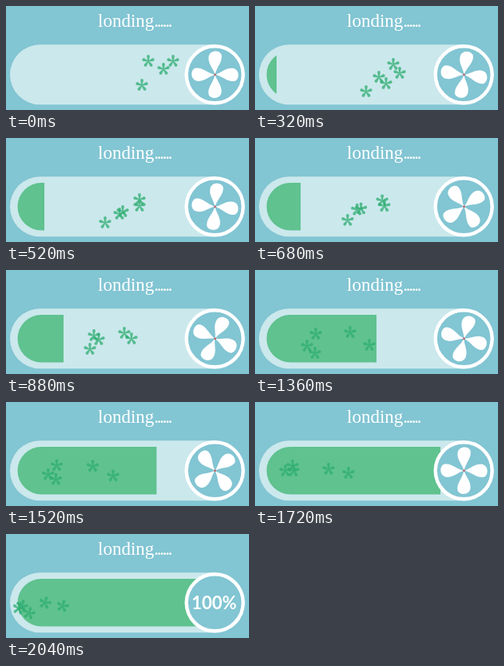
These frames come from a looping animation (304 px wide and 130 px high, 2.08 s). An HTML page:

```html
<!DOCTYPE html>
<html lang="en">
<head>
<meta charset="utf-8">
<title>Loading bar</title>
<style>
  html, body { margin: 0; width: 100%; height: 100%; overflow: hidden; background: #82c5d3; }
  svg { display: block; width: 100vw; height: 100vh; }
  .title { font: 23px "Liberation Serif", serif; fill: #fff; }
  .dots { letter-spacing: -2.25px; }
  .percent { font: bold 22px Lato, sans-serif; fill: #fff; text-anchor: middle; }
</style>
</head>
<body>
<svg viewBox="0 0 304 130">
  <defs>
    <clipPath id="groove"><rect x="14.5" y="56" width="270" height="59.5" rx="29.7"/></clipPath>
    <path id="petal" d="M-.6 0L-1.9 -6A1.9 1.9 0 0 1 1.9 -6L.6 0Z"/>
    <g id="leaf" fill="#2fae72" opacity=".76">
      <use href="#petal"/>
      <use href="#petal" transform="rotate(72)"/>
      <use href="#petal" transform="rotate(144)"/>
      <use href="#petal" transform="rotate(216)"/>
      <use href="#petal" transform="rotate(288)"/>
    </g>
    <path id="blade" d="M0 0C-2 -8 -9 -13 -8 -22C-7 -31 6 -31 8 -25C10 -16 2 -10 0 0Z"/>
  </defs>
  <text class="title" x="115" y="25.5">londing<tspan class="dots">......</tspan></text>
  <rect x="5" y="48.3" width="290" height="75" rx="37.5" fill="#cbe8ec"/>
  <rect id="fill" x="14" y="55" height="62" fill="#5fc28f" clip-path="url(#groove)"/>
  <g id="leaves"></g>
  <circle cx="261.2" cy="85.8" r="35.5" fill="#82c5d3" stroke="#fff" stroke-width="4.4"/>
  <g id="fan" fill="#fff">
    <use href="#blade"/>
    <use href="#blade" transform="rotate(90)"/>
    <use href="#blade" transform="rotate(180)"/>
    <use href="#blade" transform="rotate(270)"/>
    <circle r="1.4" fill="#c0606c"/>
  </g>
  <g id="done"><text class="percent" y="8">100%</text></g>
</svg>
<script>
const LOOP = 2080, STEP = 40;
const times = [0, 320, 520, 880, 1360, 1720, 2040];
const edge = [14, 27, 48, 72, 152, 232, 262];
const spin = [0, 98, 185, 295, 465, 540, 630];
// each leaf: x positions, then y positions, at the key times
const paths = [
  [[178, 155, 142, 110, 76, 47, 20], [69, 89, 95, 82, 80, 80, 90]],
  [[209, 173, 167, 148, 119, 92, 49], [69, 73, 77, 79, 78, 84, 86]],
  [[170, 139, 124, 105, 65, 38, 16], [99, 107, 106, 99, 95, 86, 93]],
  [[197, 164, 146, 116, 75, 48, 29], [79, 97, 92, 87, 104, 86, 99]],
  [[236, 181, 167, 157, 143, 117, 71], [86, 84, 85, 86, 94, 89, 90]]
];

const $ = id => document.getElementById(id);
const clamp = v => Math.max(0, Math.min(1, v));
const ramp = (t, a, b) => clamp((t - a) / (b - a));
const place = (el, x, y, angle = 0, scale = 1) =>
  el.setAttribute("transform", `translate(${x} ${y}) rotate(${angle}) scale(${scale})`);

// smooth curve through the key values
function along(keys, t) {
  const last = times.length - 1;
  let i = 0;
  while (i < last - 1 && t >= times[i + 1]) i++;
  const slope = k => {
    const a = Math.max(0, k - 1), b = Math.min(last, k + 1);
    return (keys[b] - keys[a]) / (times[b] - times[a]);
  };
  const h = times[i + 1] - times[i], u = clamp((t - times[i]) / h), v = 1 - u;
  return v * v * (1 + 2 * u) * keys[i] + u * u * (3 - 2 * u) * keys[i + 1]
    + h * u * v * (v * slope(i) - u * slope(i + 1));
}

const leaves = paths.map(() => {
  const el = document.createElementNS("http://www.w3.org/2000/svg", "use");
  el.setAttribute("href", "#leaf");
  return $("leaves").appendChild(el);
});

function draw(t) {
  $("fill").setAttribute("width", Math.max(0, along(edge, t) - 14));
  const tilt = 14 * ramp(t, 1720, 2040);
  paths.forEach(([x, y], i) => place(leaves[i], along(x, t), along(y, t), tilt));
  place($("fan"), 261.5, 85.8, along(spin, t), 1 - ramp(t, 1760, 1880));
  place($("done"), 260.5, 86, 0, ramp(t, 1840, 2000));
}

const start = performance.now();
function tick() {
  const t = (performance.now() - start) % LOOP;
  draw(Math.floor(t / STEP) * STEP);
  requestAnimationFrame(tick);
}
tick();
</script>
</body>
</html>
```
